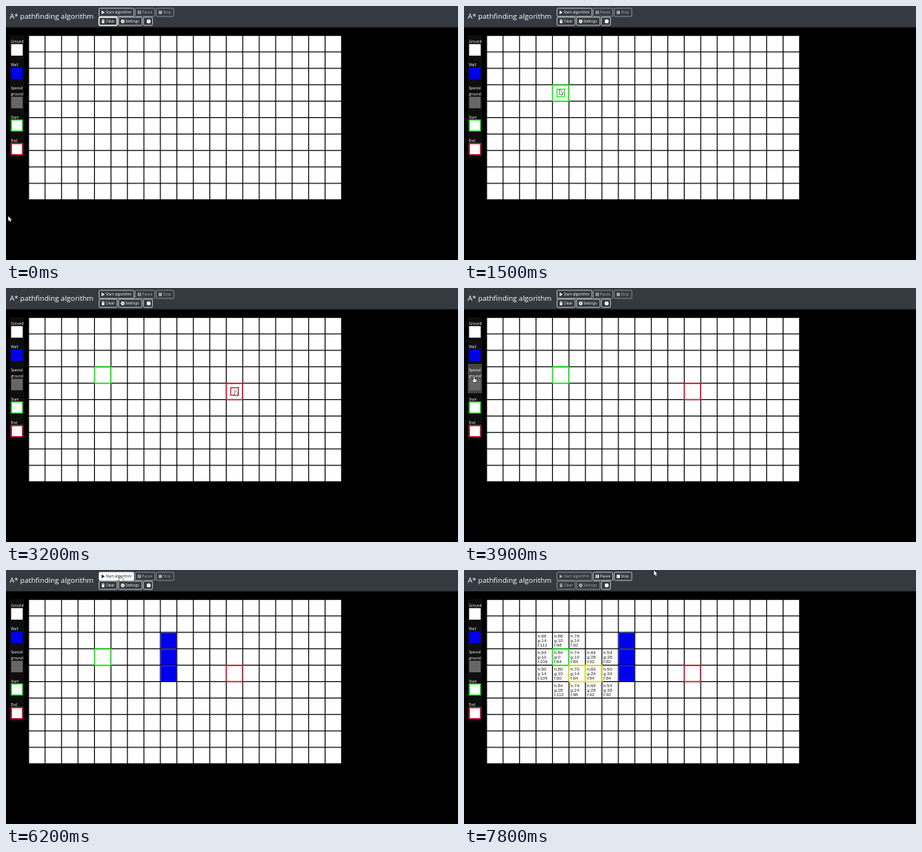
Write an HTML page with a canvas that moves like this. It is 600x338 px and loops after 8000 ms.

```html
<!DOCTYPE html>
<html lang="en">
<head>
<meta charset="utf-8">
<title>A* pathfinding algorithm</title>
<style>
html, body { margin: 0; width: 100%; height: 100%; overflow: hidden; background: #000; }
canvas { display: block; }
</style>
</head>
<body>
<canvas id="stage" width="600" height="338"></canvas>
<script>
const ctx = document.getElementById('stage').getContext('2d');
const LOOP = 8000;
const UI = '"Open Sans", "Noto Sans", sans-serif';
const GREEN = '#12f012', RED = '#dc1432', YELLOW = '#ecec10', BLUE = '#0000f0', LIGHT = '#f8f9fa';
const PITCH = 21.865, LEFT = 30, TOP = 39.2, COLS = 19, ROWS = 10;
const START = [4, 3], END = [12, 4];

// Cursor path: time, x, y
const PATH = [
  [0, 3, 280], [500, 14, 157], [560, 14, 157], [750, 147, 113], [900, 139, 114], [1100, 130, 112],
  [1500, 127.5, 111], [1700, 16, 158], [1800, 14, 167], [1900, 14, 180], [2200, 14, 188],
  [2330, 14, 188], [2700, 269, 136], [3000, 304, 136.5], [3220, 304, 136.5], [3600, 20, 182],
  [3700, 14, 180], [4000, 13, 88], [4300, 13, 90], [4460, 13, 90], [4600, 214, 92],
  [4700, 215, 123.5], [4800, 215, 139], [5000, 215, 141], [5300, 195, 73], [5600, 175, 40],
  [5900, 153, 12], [6200, 152, 8], [6650, 152, 8], [7200, 195, 4], [7800, 252, .5], [8000, 252, .5]
];

const PALETTE = [
  { y: 39, end: 70, label: ['Ground'], fill: '#fff' },
  { y: 70, end: 101, label: ['Wall'], fill: BLUE },
  { y: 101, end: 140, label: ['Special', 'ground'], fill: '#666' },
  { y: 140, end: 170.5, label: ['Start'], fill: '#fff', edge: GREEN },
  { y: 170.5, end: 202, label: ['End'], fill: '#fff', edge: RED }
];

const BUTTONS = [
  { x: 123.5, y: 3, w: 46.3, label: 'Start algorithm', icon: play, on: t => t < 6300 },
  { x: 171.5, y: 3, w: 26, label: 'Pause', icon: pause, on: t => t >= 6300 },
  { x: 199.4, y: 3, w: 23.4, label: 'Stop', icon: stop, on: t => t >= 6300 },
  { x: 123.5, y: 14.9, w: 24, label: 'Clear', icon: trash, on: t => t < 6300, focus: t => t < 500 },
  { x: 149.5, y: 14.9, w: 31, label: 'Settings', icon: gear, on: t => t < 6300 },
  { x: 182.4, y: 14.9, w: 12, label: '', icon: dot, on: () => true }
];

const ARROW = new Path2D('M0 0V6.6L1.6 5.2L2.7 7.6L3.8 7.1L2.7 4.8H4.8Z');
const HAND = new Path2D('M-.6 .5Q0-.4 .6 .5V2.8L3 3.3Q3.6 3.5 3.4 4.4L2.8 7H-.5L-2.3 4.6Q-2.2 3.6-.6 4.6Z');

function rect(x, y, w, h, color) { ctx.fillStyle = color; ctx.fillRect(x, y, w, h); }
function frame(x, y, w, h, color, width) {
  ctx.strokeStyle = color;
  ctx.lineWidth = width;
  ctx.strokeRect(x, y, w, h);
}
function text(str, x, y, font, color) {
  ctx.font = font;
  ctx.fillStyle = color;
  ctx.fillText(str, x, y);
}
function disc(x, y, r) { ctx.beginPath(); ctx.arc(x, y, r, 0, 7); ctx.fill(); }

// Icons are centred on x, y and use the current colour
function play(x, y) {
  ctx.beginPath();
  ctx.moveTo(x - 2, y - 2.5);
  ctx.lineTo(x + 2.2, y);
  ctx.lineTo(x - 2, y + 2.5);
  ctx.fill();
}
function pause(x, y) { ctx.fillRect(x - 2.1, y - 2.3, 1.7, 4.6); ctx.fillRect(x + .5, y - 2.3, 1.7, 4.6); }
function stop(x, y) { ctx.fillRect(x - 2.1, y - 2.1, 4.3, 4.3); }
function trash(x, y) {
  ctx.fillRect(x - 2, y - 2, 4, .8);
  ctx.fillRect(x - .8, y - 2.6, 1.6, .8);
  ctx.fillRect(x - 1.6, y - .9, 3.2, 3.4);
}
function gear(x, y) {
  ctx.lineWidth = 1.5;
  ctx.beginPath();
  ctx.arc(x, y, 1.5, 0, 7);
  ctx.stroke();
  for (let i = 0; i < 8; i++) disc(x + 2.2 * Math.cos(i * Math.PI / 4), y + 2.2 * Math.sin(i * Math.PI / 4), .5);
}
function dot(x, y) { disc(x + 1.6, y, 2.6); }

function cursorAt(t) {
  const i = PATH.findIndex(p => p[0] > t);
  const [t0, x0, y0] = PATH[i - 1], [t1, x1, y1] = PATH[i];
  const k = (t - t0) / (t1 - t0);
  return [x0 + (x1 - x0) * k, y0 + (y1 - y0) * k];
}

const cellX = c => LEFT + c * PITCH;
const cellY = r => TOP + r * PITCH;
const inside = (x, y, l, t, r, b) => x >= l && x < r && y >= t && y < b;

function fillCell(c, r, color) { rect(cellX(c) + .6, cellY(r) + .6, PITCH - 1.2, PITCH - 1.2, color); }
function edgeCell([c, r], color) { frame(cellX(c) + .2, cellY(r) + .2, PITCH - .2, PITCH - .2, color, 1.5); }

function distance([c, r]) {
  const dx = Math.abs(END[0] - c), dy = Math.abs(END[1] - r);
  return 10 * Math.max(dx, dy) + 4 * Math.min(dx, dy);
}

// Opened nodes, each with its cost from the start
function search(t) {
  const open = new Map();
  if (t >= 6300) open.set(START.join(), 0);
  [[6700, 4, 3], [7150, 5, 4], [7600, 6, 4]].forEach(([at, c, r]) => {
    if (t < at) return;
    const g = open.get([c, r].join());
    for (let dy = -1; dy <= 1; dy++) for (let dx = -1; dx <= 1; dx++) {
      const key = [c + dx, r + dy].join();
      if (!open.has(key)) open.set(key, g + (dx && dy ? 14 : 10));
    }
  });
  return open;
}

function drawBar(t, mx, my) {
  rect(0, 0, 600, 28.4, '#343a40');
  text('A* pathfinding algorithm', 5, 17.3, '500 9.6px ' + UI, '#fff');
  let hand = false;
  for (const b of BUTTONS) {
    const on = b.on(t), hover = on && inside(mx, my, b.x, b.y, b.x + b.w, b.y + 11);
    const color = hover ? '#212529' : LIGHT;
    hand = hand || hover;
    ctx.globalAlpha = on ? 1 : .6;
    ctx.beginPath();
    ctx.roundRect(b.x, b.y, b.w, 10.9, 1.3);
    if (hover) { ctx.fillStyle = LIGHT; ctx.fill(); }
    ctx.strokeStyle = LIGHT;
    ctx.lineWidth = b.focus && b.focus(t) ? 1.6 : .7;
    ctx.stroke();
    text(b.label, b.x + 9, b.y + 7.3, '4.85px ' + UI, color);
    ctx.strokeStyle = color;
    b.icon(b.x + 5.4, b.y + 5.5);
    ctx.globalAlpha = 1;
  }
  return hand;
}

function drawPalette(mx, my) {
  rect(5, 39, 19, 163, '#0e0e0e');
  let hand = false;
  for (const p of PALETTE) {
    const hover = inside(mx, my, 5, p.y, 24, p.end);
    if (hover) rect(5, p.y, 19, p.end - p.y, '#444');
    hand = hand || hover;
    p.label.forEach((s, i) => text(s, 6.5, p.y + 10 + i * 7.6, '4.75px ' + UI, '#fff'));
    const top = p.end - 19.3;
    rect(6.8, top, 15.4, 15.4, p.fill);
    if (p.edge) frame(7.3, top + .6, 14.4, 14.4, p.edge, 1.3);
  }
  return hand;
}

function drawGrid(t, mx, my) {
  for (let r = 0; r < ROWS; r++) for (let c = 0; c < COLS; c++) fillCell(c, r, '#fff');
  [4600, 4680, 4750].forEach((at, i) => { if (t >= at) fillCell(8, 2 + i, BLUE); });

  for (const [key, g] of search(t)) {
    const cell = key.split(',').map(Number), h = distance(cell);
    ['h:' + h, 'g:' + g, 'f:' + (h + g)].forEach((s, i) =>
      text(s, cellX(cell[0]) + 2, cellY(cell[1]) + 7.1 + i * 6, '6px "Liberation Sans", Arial, sans-serif', '#222'));
  }
  if (t >= 1400) edgeCell(START, GREEN);
  if (t >= 3200) edgeCell(END, RED);
  if (t >= 7150) edgeCell([5, 4], YELLOW);
  if (t >= 7600) edgeCell([6, 4], YELLOW);

  // Preview of the chosen tool under the cursor
  const c = Math.floor((mx - LEFT) / PITCH), r = Math.floor((my - TOP) / PITCH);
  if (c < 0 || c >= COLS || r < 0 || r >= ROWS) return;
  const x = cellX(c) + 5.4, y = cellY(r) + 5.4, size = 11.2;
  if (t >= 4200) rect(x, y, size, size, BLUE);
  else frame(x + .6, y + .6, size - 1.2, size - 1.2, t < 2250 ? GREEN : RED, 1.3);
}

function drawCursor(x, y, hand) {
  const shape = hand ? HAND : ARROW;
  ctx.save();
  ctx.translate(x, y);
  ctx.strokeStyle = '#000';
  ctx.lineWidth = .9;
  ctx.stroke(shape);
  ctx.fillStyle = '#fff';
  ctx.fill(shape);
  ctx.restore();
}

function draw(now) {
  const t = now % LOOP, [mx, my] = cursorAt(t);
  rect(0, 0, 600, 338, '#000');
  const overBar = drawBar(t, mx, my), overPalette = drawPalette(mx, my);
  drawGrid(t, mx, my);
  drawCursor(mx, my, overBar || overPalette);
}

const begin = performance.now();
function tick() {
  draw(performance.now() - begin);
  requestAnimationFrame(tick);
}
tick();
</script>
</body>
</html>
```
